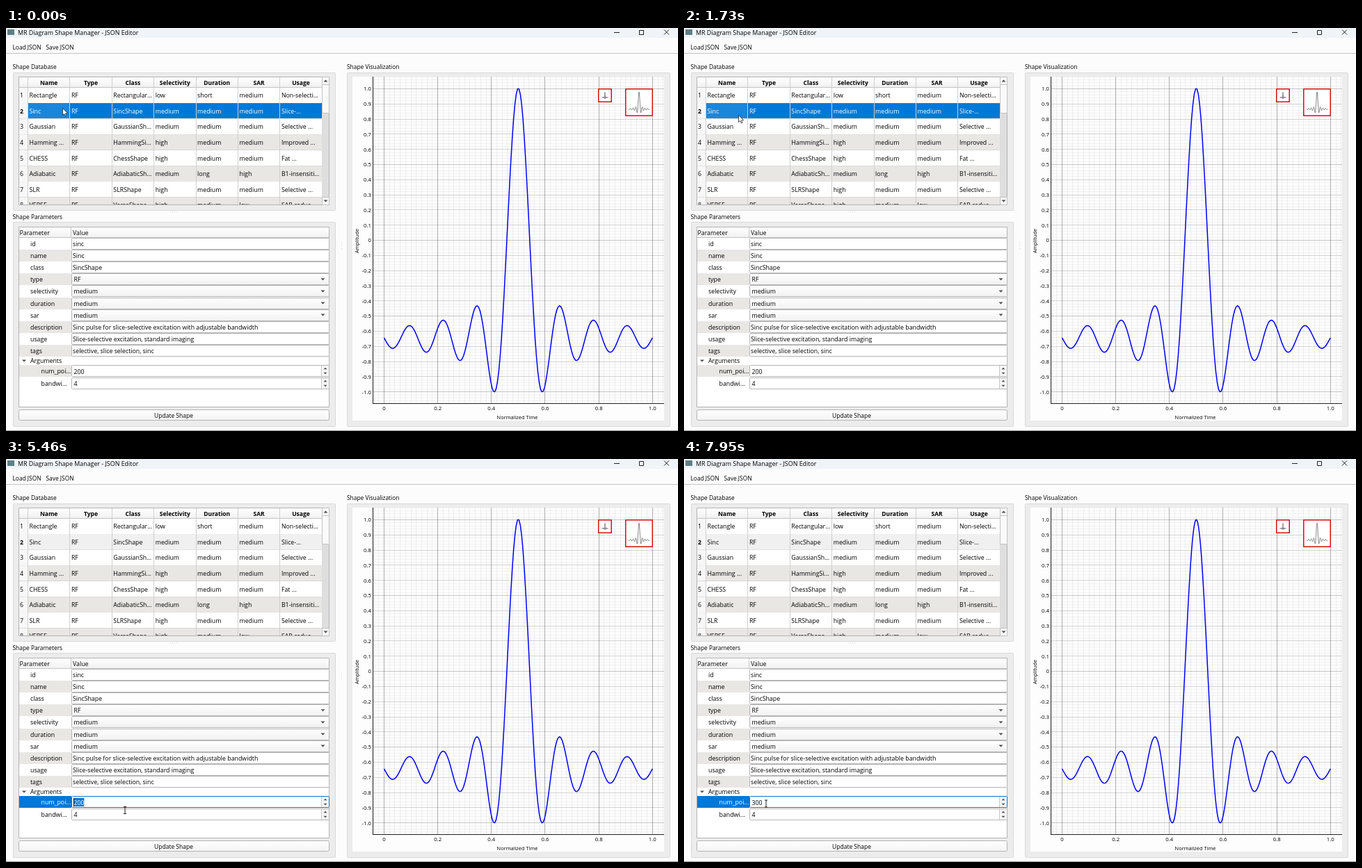
Recreate the animation shown at these times as an HTML page with a canvas. Size 966 by 580 pixels, loop 8 s.

```html
<!DOCTYPE html>
<html lang="en">
<head>
<meta charset="utf-8">
<title>MR Diagram Shape Manager</title>
<style>
html, body { margin: 0; width: 100%; height: 100%; overflow: hidden; background: #fcfcfc; }
canvas { display: block; }
</style>
</head>
<body>
<canvas id="stage" width="966" height="580"></canvas>
<script>
const ctx = document.getElementById('stage').getContext('2d');
const LOOP = 8000, BLUE = '#0078d7', GREY = '#e9e7e4', EDGE = '#b4b4b4';
const HEADS = ['Name', 'Type', 'Class', 'Selectivity', 'Duration', 'SAR', 'Usage'];
const ROWS = [
  'Rectangle|RF|Rectangular...|low|short|medium|Non-selecti...',
  'Sinc|RF|SincShape|medium|medium|medium|Slice-...',
  'Gaussian|RF|GaussianSh...|medium|medium|medium|Selective ...',
  'Hamming ...|RF|HammingSi...|high|medium|medium|Improved ...',
  'CHESS|RF|ChessShape|high|medium|medium|Fat ...',
  'Adiabatic|RF|AdiabaticSh...|medium|long|high|B1-insensiti...',
  'SLR|RF|SLRShape|high|medium|medium|Selective ...',
  'VERSE|RF|VerseShape|high|medium|low|SAR-reduc...'
].map(r => r.split('|'));
const FIELDS = ['id', 'name', 'class', 'type', 'selectivity', 'duration', 'sar', 'description', 'usage', 'tags'];
const VALUES = [
  ['rectangle', 'Rectangle', 'RectangularShape', 'RF', 'low', 'short', 'medium',
    'Rectangular - General RF/Trigger pulse shape',
    'Non-selective excitation, calibration, shimming',
    'broadband, non-selective, rectangular, hard'],
  ['sinc', 'Sinc', 'SincShape', 'RF', 'medium', 'medium', 'medium',
    'Sinc pulse for slice-selective excitation with adjustable bandwidth',
    'Slice-selective excitation, standard imaging',
    'selective, slice selection, sinc']
];
// Pointer moves: start, end, steps, target x, target y
const MOVES = [
  [460, 590, 2, 80, 102],
  [1310, 1730, 4, 78, 125],
  [2160, 2853, 6, 122, 530],
  [2991, 3130, 2, 128, 494],
  [3420, 3860, 4, 97, 494],
  [4000, 4300, 3, 171, 505.5],
  [7550, 7950, 4, 118, 496]
];

function rect(x, y, w, h, fill) {
  ctx.fillStyle = fill;
  ctx.fillRect(x, y, w, h);
}

function box(x, y, w, h, fill, edge, r = 0) {
  ctx.beginPath();
  ctx.roundRect(x + .5, y + .5, w - 1, h - 1, r);
  ctx.fillStyle = fill;
  ctx.fill();
  ctx.lineWidth = 1;
  ctx.strokeStyle = edge;
  ctx.stroke();
}

function text(s, x, y, { size = 8.8, color = '#000', align = 'left', bold = false } = {}) {
  ctx.font = `${bold ? 'bold ' : ''}${size}px "Open Sans", "Noto Sans", sans-serif`;
  ctx.textAlign = align;
  ctx.fillStyle = color;
  ctx.fillText(s, x, y);
}

function path(points, color, width) {
  ctx.beginPath();
  points.forEach(([x, y]) => ctx.lineTo(x, y));
  ctx.strokeStyle = color;
  ctx.lineWidth = width;
  ctx.stroke();
}

function arrow(x, y, dir = 1, size = 3) {
  ctx.beginPath();
  ctx.moveTo(x - size, y - dir * size / 2);
  ctx.lineTo(x + size, y - dir * size / 2);
  ctx.lineTo(x, y + dir * size / 2);
  ctx.fillStyle = '#4a4a4a';
  ctx.fill();
}

function shade(y, h, from, to) {
  const g = ctx.createLinearGradient(0, y, 0, y + h);
  g.addColorStop(0, from);
  g.addColorStop(1, to);
  return g;
}

function stepped(t, t0, t1, n) {
  if (t < t0) return 0;
  return Math.min(1, (Math.floor((t - t0) / (t1 - t0) * (n - 1) + 1e-6) + 1) / n);
}

function pointer(t) {
  let x = 81, y = 115;
  for (const [t0, t1, n, tx, ty] of MOVES) {
    const p = stepped(t, t0, t1, n);
    x += (tx - x) * p;
    y += (ty - y) * p;
  }
  return [x, y];
}

// Pulse samples as [time 0..1, amplitude -1..1]
function pulse(row, count) {
  const pts = Array.from({ length: count }, (_, i) => {
    const u = i / (count - 1), a = 16 * Math.PI * (u - .5);
    const v = row ? (Math.abs(a) < 1e-9 ? 1 : Math.sin(a) / a) : +(Math.abs(u - .5) <= .4);
    return [u, v];
  });
  const vs = pts.map(p => p[1]), lo = Math.min(...vs), hi = Math.max(...vs);
  return pts.map(([u, v]) => [u, 2 * (v - lo) / (hi - lo) - 1]);
}

function drawWindow() {
  rect(0, 0, 966, 580, '#fcfcfc');
  rect(0, 0, 966, 14, '#eff4f9');
  rect(2, 2, 10, 8, '#5f7f86');
  text('MR Diagram Shape Manager - JSON Editor', 17, 10, { size: 8.9 });
  path([[874, 6.5], [882, 6.5]], '#222', 1);
  ctx.lineWidth = 1;
  ctx.strokeRect(910.5, 3.5, 6, 6);
  path([[946, 2.5], [953, 9.5]], '#222', 1);
  path([[953, 2.5], [946, 9.5]], '#222', 1);
  text('Load JSON', 9.5, 31, { size: 8.4 });
  text('Save JSON', 57.5, 31, { size: 8.4 });
  rect(0, 36, 966, 1, '#c4c4c4');
  rect(0, 579, 966, 1, '#9a9a9a');
  text('Shape Database', 9.5, 59, { size: 8.4 });
  text('Shape Parameters', 9.5, 275, { size: 8.4 });
  text('Shape Visualization', 490, 59, { size: 8.4 });
  box(10, 64, 464, 199, '#ececec', '#d9d9d9', 1);
  box(10, 279, 464, 295, '#ececec', '#d9d9d9', 1);
  box(490, 64, 465, 510, '#ececec', '#d9d9d9', 1);
  for (let i = 0; i < 4; i++) {
    rect(236 + i * 3, 264, 1, 1, '#d5d5d5');
    rect(482, 308 + i * 3, 1, 1, '#d5d5d5');
  }
}

function drawTable(row, focus) {
  const left = i => 31.3 + 60.4 * i, top = i => 85.5 + 22.6 * i;
  box(18, 70, 447, 185, '#fff', EDGE);
  rect(19, 71, 435, 14.5, shade(71, 14, '#fff', '#f1f1f1'));
  ctx.save();
  ctx.beginPath();
  ctx.rect(18, 70, 436, 184);
  ctx.clip();
  HEADS.forEach((h, i) => text(h, left(i) + 30.3, 81.6, { size: 8.5, bold: true, align: 'center' }));
  ROWS.forEach((cells, r) => {
    const y = top(r), on = r === row, lit = on && !focus;
    rect(19, y, 12.3, 22.6, '#f7f7f7');
    rect(31.3, y, 423, 22.6, lit ? BLUE : on ? '#f0f0f0' : r % 2 ? GREY : '#fff');
    if (lit) rect(31.3, y, 60.4, 22.6, '#1a86db');
    text(r + 1, 20, y + 14.6, { bold: on });
    cells.forEach((s, c) => text(s, left(c) + 2.2, y + 14.6, { color: lit ? '#fff' : '#000' }));
    rect(19, Math.round(y + 22), 435, 1, '#d2d2d2');
  });
  for (let i = 0; i < 8; i++) rect(Math.round(left(i) - .3), 71, 1, 183, '#cfcfcf');
  rect(19, 85, 435, 1, '#c4c4c4');
  ctx.restore();
  rect(454, 71, 10, 183, '#dedede');
  box(454, 70, 11, 12, '#f8f8f8', '#c2c2c2');
  box(454, 81, 11, 42, '#fafafa', '#c2c2c2');
  box(454, 243, 11, 12, '#f8f8f8', '#c2c2c2');
  arrow(459.5, 76, -1);
  arrow(459.5, 249, 1);
}

function spin(y, focus) {
  box(94, y, 371, 17, '#fff', focus ? BLUE : EDGE, 1);
  rect(454, y + 1, 10, 15, '#f6f6f6');
  rect(453, y + 1, 1, 15, '#c8c8c8');
  arrow(459, y + 5, -1, 2.5);
  arrow(459, y + 12, 1, 2.5);
}

function drawParams(t, row, focus, num) {
  box(18, 286, 447, 260, '#fff', EDGE);
  rect(19, 287, 445, 15, shade(287, 15, '#fff', '#f0f0f0'));
  rect(19, 301, 445, 1, '#c4c4c4');
  rect(93, 287, 1, 15, '#c8c8c8');
  text('Parameter', 19.5, 298);
  text('Value', 96, 298);
  FIELDS.forEach((name, i) => {
    const y = 302 + 17.1 * i, yy = Math.round(y), combo = i > 2 && i < 7;
    if (i % 2) rect(19, yy, 75, 17, GREY);
    text(name, 35, y + 12);
    box(94, yy, 371, 17, combo ? shade(yy, 17, '#fff', '#f1f1f1') : '#fff', EDGE, 1);
    text(VALUES[row][i], combo ? 97.5 : 96, y + 12);
    if (combo) arrow(455.5, y + 8.5);
  });
  arrow(26, 479);
  text('Arguments', 35, 482.3);

  rect(19, 485, 75, 17, focus ? BLUE : GREY);
  spin(485, focus);
  text('num_poi...', 50.5, 497.2, { color: focus ? '#fff' : '#000' });
  text(num, 97.5, 497.6);
  const end = 97.5 + ctx.measureText(num).width;
  let caret = end;
  if (t >= 3420 && t < 5610) {
    caret = end - (end - 97.5) * stepped(t, 3420, 3860, 4);
    ctx.save();
    ctx.beginPath();
    ctx.rect(caret, 488, end - caret, 12);
    ctx.clip();
    rect(caret, 488, end - caret, 12, BLUE);
    text(num, 97.5, 497.6, { color: '#fff' });
    ctx.restore();
  }
  const blinkOff = t >= 4890 && t < 5460 || t >= 6560 && t < 7110 || t >= 7660;
  if (focus && !blinkOff) rect(Math.floor(caret), 488, 1, 12, '#000');

  if (row) {
    spin(503, false);
    text('bandwi...', 50.5, 514.6);
    text('4', 97.5, 515);
  }
  box(18, 549, 447, 16, shade(549, 16, '#fff', '#f3f3f3'), EDGE, 2);
  text('Update Shape', 241, 560.6, { align: 'center', size: 8.5 });
}

function thumb(x, y, size, pts, pad) {
  rect(x, y, size, size, '#fff');
  ctx.strokeStyle = '#d40f14';
  ctx.lineWidth = 1.5;
  ctx.strokeRect(x + .75, y + .75, size - 1.5, size - 1.5);
  const s = size - 2 * pad;
  path(pts.map(([u, v]) => [x + pad + u * s, y + pad + (1 - v) / 2 * s]), '#555', .7);
}

function drawPlot(row, count) {
  const X = u => 543.5 + 385.8 * u, Y = v => 305.6 - 218.1 * v;
  rect(498, 70, 448, 495, '#fdfdfd');
  ctx.save();
  ctx.beginPath();
  ctx.rect(528, 70, 418, 471);
  ctx.clip();
  for (let i = -4; i <= 54; i++) {
    const a = i % 10 ? .055 : .3;
    rect(Math.round(X(i / 50) - .5), 70, 1, 471, `rgba(0,0,0,${a})`);
  }
  for (let i = -54; i <= 54; i++) {
    const a = i % 25 === 0 ? .22 : i % 5 === 0 ? .16 : .045;
    rect(528, Math.round(Y(i / 50) - .5), 418, 1, `rgba(0,0,0,${a})`);
  }
  ctx.restore();
  rect(527, 70, 1, 471, '#222');
  rect(527, 540, 419, 1, '#222');
  for (let i = -10; i <= 10; i++) {
    text(i ? (i / 10).toFixed(1) : '0', 525, Y(i / 10) + 2.8, { size: 7.8, align: 'right' });
  }
  for (let i = 0; i <= 5; i++) {
    text(i ? (i / 5).toFixed(1) : '0', X(i / 5), 550, { size: 7.8, align: 'center' });
  }
  text('Normalized Time', 735, 563, { size: 7.4, align: 'center' });
  ctx.save();
  ctx.translate(507, 306.5);
  ctx.rotate(-Math.PI / 2);
  text('Amplitude', 0, 0, { size: 7.3, align: 'center' });
  ctx.restore();

  const pts = pulse(row, count);
  ctx.lineJoin = 'round';
  path(pts.map(([u, v]) => [X(u), Y(v)]), '#00f', 1.5);
  thumb(851, 87, 20, pts, 5.5);
  thumb(890, 87, 40, pts, 5);
}

function drawPointer(t) {
  const [x, y] = pointer(t);
  const combo = y > 353 && y < 422;
  if (x > 94 && y > 302 && y < 520 && !combo) {
    path([[x, y - 5], [x, y + 5]], '#222', 1);
    for (const dy of [-5, 5]) path([[x - 2, y + dy], [x + 2, y + dy]], '#222', 1);
    return;
  }
  ctx.beginPath();
  for (const [dx, dy] of [[0, 0], [0, 10], [2.3, 8], [4, 11.5], [5.5, 10.8], [4, 7.4], [7.2, 7.2]]) {
    ctx.lineTo(x + dx + .5, y + dy + .5);
  }
  ctx.closePath();
  ctx.fillStyle = '#fff';
  ctx.fill();
  ctx.strokeStyle = '#222';
  ctx.lineWidth = .8;
  ctx.stroke();
}

function draw(now) {
  const t = now % LOOP;
  const row = t >= 870 && t < 1730 ? 0 : 1;
  const focus = t >= 3270;
  const num = !row ? '100' : t < 5610 ? '200' : t < 5880 ? '3' : t < 6000 ? '30' : '300';
  drawWindow();
  drawTable(row, focus);
  drawParams(t, row, focus, num);
  drawPlot(row, +num);
  drawPointer(t);
  requestAnimationFrame(draw);
}
requestAnimationFrame(draw);
</script>
</body>
</html>
```
